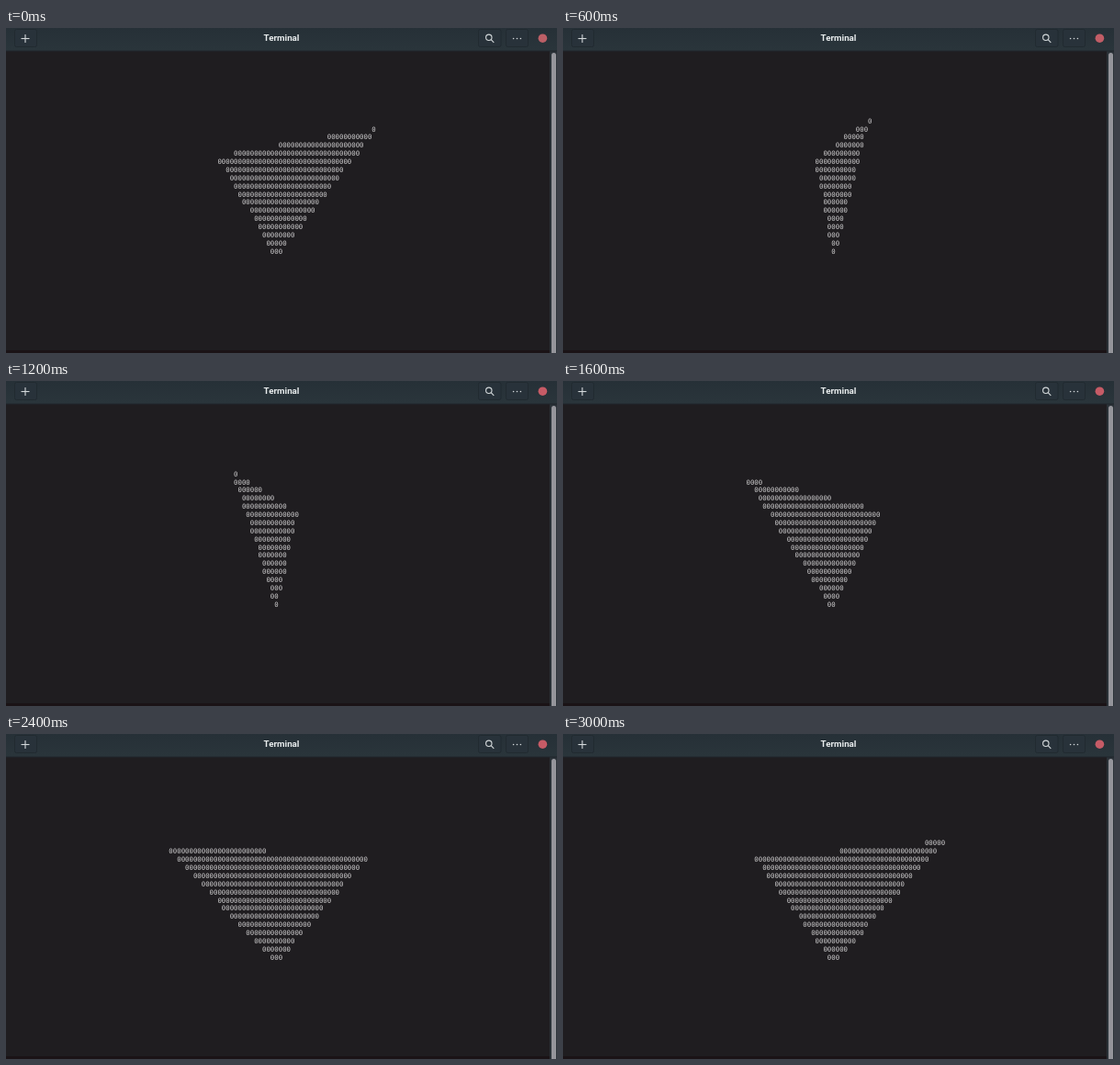
Write an HTML page with a canvas that moves like this. It is 600 by 354 pixels and loops after 3100 ms.

```html
<!DOCTYPE html>
<html lang="en">
<head>
<meta charset="utf-8">
<title>Terminal</title>
<style>
html, body { margin: 0; width: 100%; height: 100%; overflow: hidden; background: #1f1d20; }
canvas { display: block; width: 600px; height: 354px; }
</style>
</head>
<body>
<canvas id="stage"></canvas>
<script>
const W = 600, H = 354, LOOP = 3100, STEP = 100;
const canvas = document.getElementById('stage');
const ctx = canvas.getContext('2d');
const dpr = window.devicePixelRatio || 1;
canvas.width = W * dpr;
canvas.height = H * dpr;
ctx.scale(dpr, dpr);

// Character grid, counted from the bottom tip of the triangle
const CELL_W = 4.42, CELL_H = 8.875, BASE_X = 294.5, BASE_Y = 243;
const ROWS = 17, HALF_COLS = 30;

// Perspective of the turning triangle
const RADIUS = 114.2, TOP = 57, HORIZON = 185.2, DEPTH = 0.36;
const APEX = { x: BASE_X, y: 250.8 };

// Turn of the triangle: [step, degrees]
const TURN = [[0, 44], [6, 76.5], [12, 106], [16, 127], [20, 147], [24, 165], [30, 208]];

const mix = (a, b, k) => a + (b - a) * k;

function angleAt(step) {
  const i = Math.max(1, TURN.findIndex(key => key[0] >= step));
  const [s0, a0] = TURN[i - 1], [s1, a1] = TURN[i];
  return mix(a0, a1, (step - s0) / (s1 - s0)) * Math.PI / 180;
}

function project(angle) {
  const scale = 1 / (1 - DEPTH * Math.sin(angle));
  return { x: BASE_X + RADIUS * Math.cos(angle) * scale, y: HORIZON - TOP * scale };
}

// Horizontal extent of a triangle at height y
function spanAt(points, y) {
  const xs = [];
  points.forEach((p, i) => {
    const q = points[(i + 1) % points.length];
    if ((p.y <= y) !== (q.y <= y)) xs.push(mix(p.x, q.x, (y - p.y) / (q.y - p.y)));
  });
  return xs.sort((a, b) => a - b);
}

function drawTriangle(angle) {
  const points = [project(angle), project(angle + Math.PI), APEX];
  ctx.fillStyle = '#d0cfd0';
  ctx.font = '7.35px "DejaVu Sans Mono", monospace';
  ctx.textAlign = 'center';
  ctx.textBaseline = 'alphabetic';
  for (let row = 0; row < ROWS; row++) {
    const y = BASE_Y - row * CELL_H;
    const [left, right] = spanAt(points, y);
    if (left === undefined) continue;
    for (let col = -HALF_COLS; col <= HALF_COLS; col++) {
      const x = BASE_X + col * CELL_W;
      if (x >= left && x <= right) ctx.fillText('0', x, y + 2.7);
    }
  }
}

function rect(x, y, w, h, color) {
  ctx.fillStyle = color;
  ctx.fillRect(x, y, w, h);
}

function disc(x, y, r, color) {
  ctx.fillStyle = color;
  ctx.beginPath();
  ctx.arc(x, y, r, 0, Math.PI * 2);
  ctx.fill();
}

function line(x0, y0, x1, y1) {
  ctx.beginPath();
  ctx.moveTo(x0, y0);
  ctx.lineTo(x1, y1);
  ctx.stroke();
}

function button(x, w) {
  ctx.beginPath();
  ctx.roundRect(x, 1.5, w, 19, 2);
  ctx.fillStyle = '#28323a';
  ctx.fill();
  ctx.strokeStyle = '#212a30';
  ctx.lineWidth = 1;
  ctx.stroke();
}

function drawHeader(step) {
  const shade = ctx.createLinearGradient(0, 0, 0, 25);
  shade.addColorStop(0, '#263037');
  shade.addColorStop(1, '#2a353b');
  rect(0, 0, W, 25, shade);
  rect(0, 24.5, W, 1, '#20272c');

  button(9.5, 24);
  button(514.5, 24.5);
  button(544.5, 24);

  ctx.strokeStyle = '#d3d8da';
  ctx.lineWidth = 1.1;
  line(16.5, 11.5, 25.5, 11.5);
  line(21, 7, 21, 16);

  ctx.beginPath();
  ctx.arc(525.8, 10.3, 3.2, 0, Math.PI * 2);
  ctx.stroke();
  line(528.2, 12.7, 531.3, 15.8);
  for (const x of [552.6, 556.5, 560.4]) disc(x, 11.5, 0.8, '#d3d8da');

  const glow = Math.min(1, step / 12);
  disc(584.4, 11.2, 4.8, `rgb(${mix(188, 198, glow)}, ${mix(95, 91, glow)}, 102)`);

  ctx.fillStyle = '#e9edee';
  ctx.font = 'bold 9.8px Roboto, sans-serif';
  ctx.textAlign = 'center';
  ctx.textBaseline = 'alphabetic';
  ctx.fillText('Terminal', 300, 14.2);
}

function drawFrame() {
  rect(0, 25, W, H - 25, '#1f1d20');
  rect(0, 351, W, 3, '#1a1316');
  rect(592, 25, 8, H - 25, '#2a3137');
  ctx.fillStyle = '#95959b';
  ctx.beginPath();
  ctx.roundRect(594, 27, 5, H, 2.5);
  ctx.fill();
}

function render(now) {
  const step = Math.floor((now % LOOP) / STEP);
  drawFrame();
  drawHeader(step);
  drawTriangle(angleAt(step));
}

let start;
function tick(now) {
  start ??= now;
  render(Math.max(0, now - start));
  requestAnimationFrame(tick);
}
render(0);
requestAnimationFrame(tick);
</script>
</body>
</html>
```
